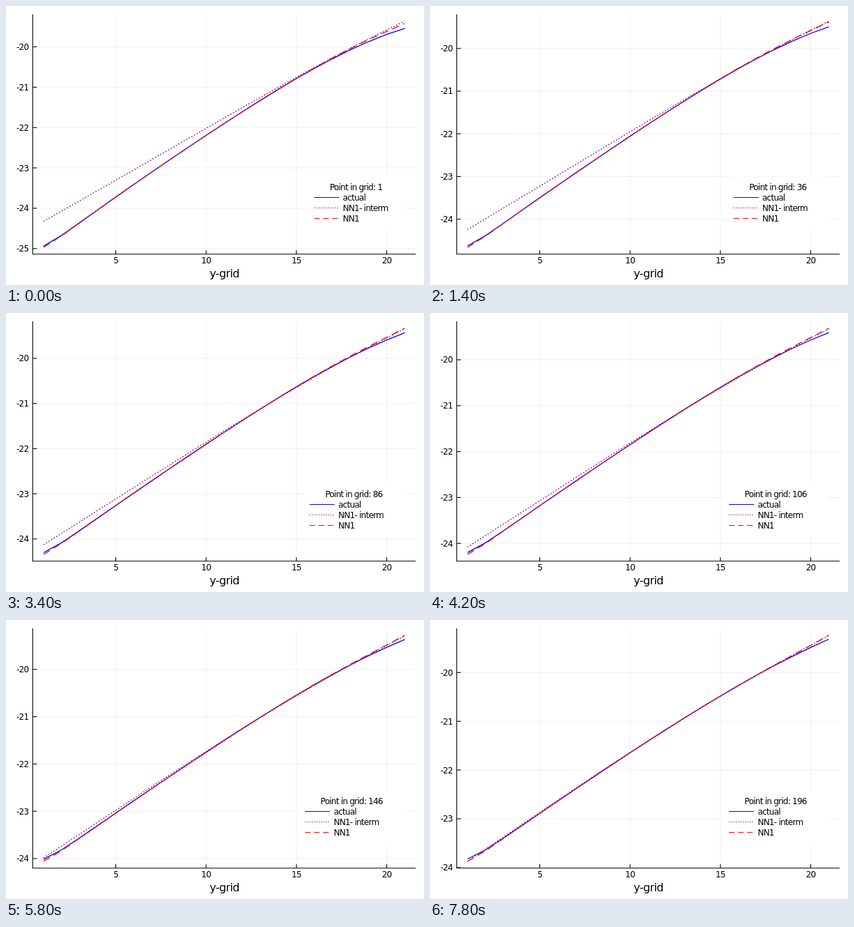
An HTML page with a canvas for the animation above (8 s loop, 600 by 400 pixels).

```html
<!DOCTYPE html>
<html lang="en">
<head>
<meta charset="utf-8">
<title>Fit along the y-grid</title>
<style>
  html, body { margin: 0; width: 100%; height: 100%; overflow: hidden; background: #fff; }
  canvas { display: block; width: 600px; height: 400px; }
</style>
</head>
<body>
<canvas id="plot"></canvas>
<script>
const canvas = document.getElementById('plot');
const ctx = canvas.getContext('2d');
const ratio = window.devicePixelRatio || 1;
canvas.width = 600 * ratio;
canvas.height = 400 * ratio;

const FONT = '"DejaVu Sans", sans-serif';
const LEFT = 38.3, RIGHT = 588, TOP = 12, BOTTOM = 355.7;
const PAD = 0.03, STEP = 200, LOOP = 8000, LAST = 196;
const GRID = Array.from({ length: 21 }, (_, i) => i + 1);

const lerp = (a, b, t) => a + (b - a) * t;

// Quartic in the y-grid index, scaled to -1..1.
function quartic(coefs, x) {
  const s = (x - 11) / 10;
  return coefs.reduceRight((sum, c) => sum * s + c, 0);
}

const linear = n => (n - 1) / (LAST - 1);
const logarithmic = n => Math.log((n + 90) / 91) / Math.log((LAST + 90) / 91);

// Low y levels rise logarithmically with the grid point, high ones more evenly.
const progress = (x, n) => lerp(logarithmic(n), linear(n), 0.03 * x);

function actual(x, n) {
  const first = quartic([-21.9, 2.921, -0.253, -0.179, -0.131], x);
  const last = quartic([-21.404, 2.394, -0.18, -0.097, -0.03], x);
  return lerp(first, last, progress(x, n)) + 0.085 * Math.exp(1.6 * (1 - x));
}

function interm(x, n) {
  const first = quartic([-21.763, 2.561, -0.055, -0.08, -0.027], x);
  const last = quartic([-21.4, 2.36, -0.175, -0.045, 0.018], x);
  return lerp(first, last, linear(n) ** (1 + (x / 21) ** 8));
}

// The fitted net strays from the actual curve only near both ends.
function net(x, n) {
  const w = progress(x, n);
  const low = lerp(-0.027, -0.046, w) * Math.exp(1 - x);
  const high = lerp(0.121, 0.083, w) * Math.exp((x - 21) / lerp(2.2, 1.4, w));
  return actual(x, n) + low + high;
}

const CURVES = [
  { name: 'actual', color: '#00f', dash: [], value: actual },
  { name: 'NN1- interm', color: '#800080', dash: [1.3, 2], value: interm },
  { name: 'NN1', color: '#f00', dash: [8, 5], value: net }
];

const px = x => LEFT + (RIGHT - LEFT) * (PAD + (x - 1) / 20) / (1 + 2 * PAD);

function line(points, color, width, dash = []) {
  ctx.strokeStyle = color;
  ctx.lineWidth = width;
  ctx.setLineDash(dash.map(d => d * width));
  ctx.beginPath();
  points.forEach(([x, y]) => ctx.lineTo(x, y));
  ctx.stroke();
}

function text(str, x, y, align, size = 12, spacing = -0.75) {
  ctx.font = size + 'px ' + FONT;
  ctx.letterSpacing = spacing + 'px';
  ctx.textAlign = align;
  ctx.fillStyle = '#000';
  ctx.fillText(str, x, y);
}

function drawAxes(ticks, py) {
  const xs = [5, 10, 15, 20];
  xs.forEach(x => line([[px(x), TOP], [px(x), BOTTOM]], '#f0f0f0', 1));
  ticks.forEach(v => line([[LEFT, py(v)], [RIGHT, py(v)]], '#f0f0f0', 1));
  line([[LEFT, TOP], [LEFT, BOTTOM], [RIGHT, BOTTOM]], '#000', 1.1);
  xs.forEach(x => {
    line([[px(x), BOTTOM], [px(x), BOTTOM - 5.5]], '#000', 1.1);
    text(x, px(x), 369.3, 'center');
  });
  ticks.forEach(v => {
    line([[LEFT, py(v)], [LEFT + 6, py(v)]], '#000', 1.1);
    text(v, 32.3, py(v) + 4.4, 'right');
  });
  text('y-grid', 313.5, 389, 'center', 16, -0.6);
}

function drawLegend(n) {
  const x = 442.3 - 6.6 * (String(n).length - 1);
  ctx.fillStyle = '#fff';
  ctx.fillRect(x - 6.5, 244.5, 577.5 - x, 75.5);
  text('Point in grid: ' + n, x + 22.5, 263.6, 'left');
  CURVES.forEach(({ name, color, dash }, i) => {
    const y = 274.5 + 15 * i;
    line([[x, y], [x + 36, y]], color, 1, dash);
    text(name, x + 41.3, y + 4.2, 'left');
  });
}

function draw(time) {
  const n = 1 + 5 * Math.floor((time % LOOP) / STEP);
  const series = CURVES.map(c => GRID.map(x => c.value(x, n)));
  const min = Math.min(...series.flat()), max = Math.max(...series.flat());
  const margin = PAD * (max - min);
  const lo = min - margin, hi = max + margin;
  const py = v => TOP + (hi - v) / (hi - lo) * (BOTTOM - TOP);
  const ticks = [];
  for (let v = Math.ceil(lo); v <= hi; v++) ticks.push(v);

  ctx.setTransform(ratio, 0, 0, ratio, 0, 0);
  ctx.fillStyle = '#fff';
  ctx.fillRect(0, 0, 600, 400);
  drawAxes(ticks, py);
  CURVES.forEach(({ color, dash }, i) =>
    line(series[i].map((v, j) => [px(GRID[j]), py(v)]), color, 1.3, dash));
  drawLegend(n);
}

const start = performance.now();
function tick() {
  draw(performance.now() - start);
  requestAnimationFrame(tick);
}
tick();
</script>
</body>
</html>
```
